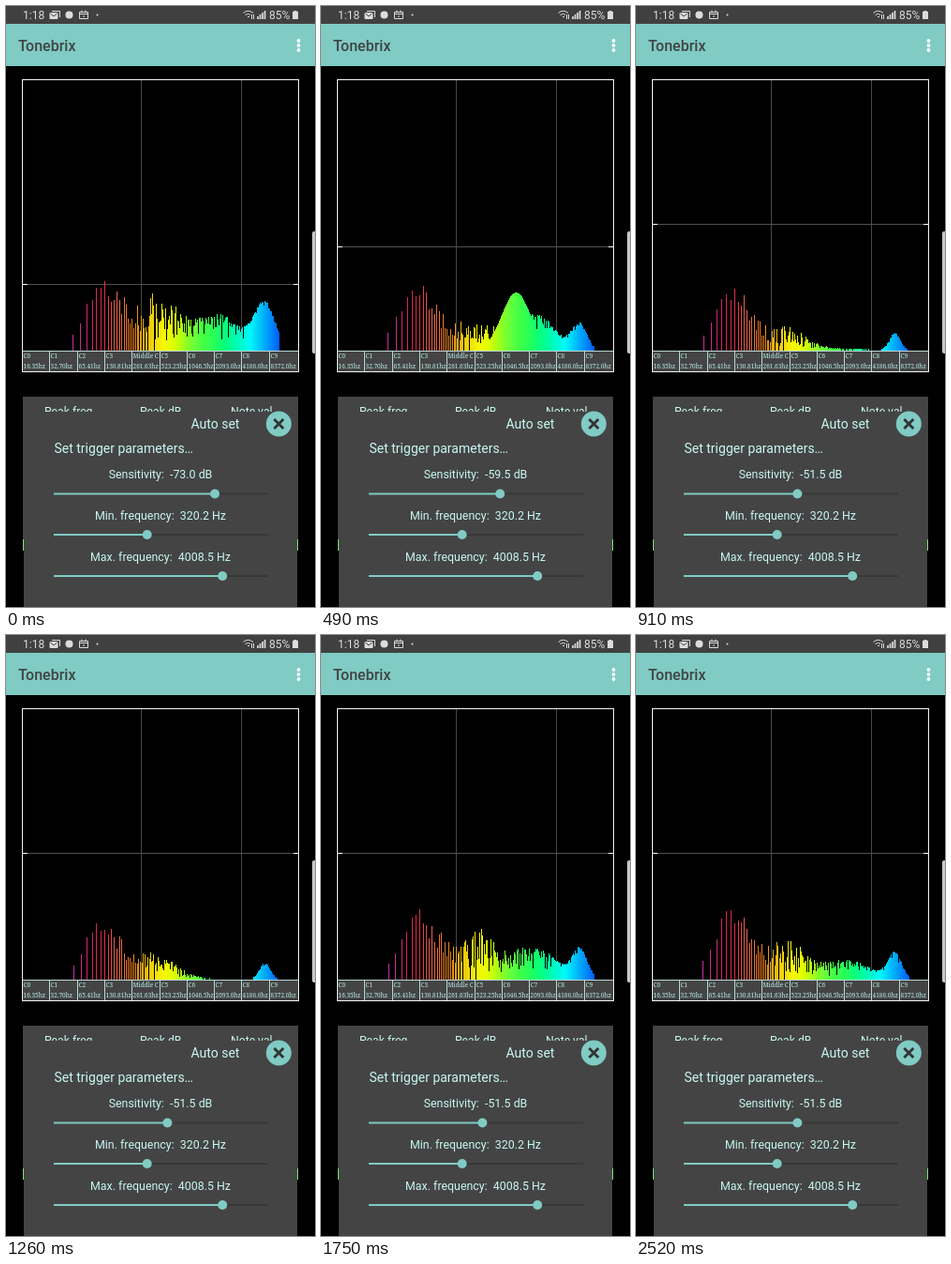
Write an HTML page with a canvas that moves like this. It is 330 by 640 pixels and loops after 2.59 s.

```html
<!DOCTYPE html>
<html lang="en">
<head>
<meta charset="utf-8">
<title>Spectrum trigger</title>
<style>
  html, body { margin: 0; width: 100%; height: 100%; overflow: hidden; background: #000; }
  canvas, svg { position: absolute; left: 0; top: 0; width: 330px; height: 640px; }
  text { font-family: Roboto, sans-serif; white-space: pre; }
  .status { font-size: 12px; fill: #dcdcdc; }
  .title { font-size: 16px; font-weight: 500; fill: #3f4443; }
  .notes text { font: 6.5px "Noto Serif", serif; fill: #b9f0ea; }
  .panel text { fill: #c8f8f2; }
  .small { font-size: 12.2px; }
  .head { font-size: 14px; }
  .value { font-size: 12.4px; text-anchor: middle; }
</style>
</head>
<body>
<canvas id="plot" width="330" height="640"></canvas>
<svg id="ui" viewBox="0 0 330 640">
  <rect width="330" height="19" fill="#404040"/>
  <g class="status">
    <text x="18" y="14">1:18</text>
    <text x="281" y="14">85%</text>
  </g>
  <g fill="none" stroke="#dcdcdc">
    <path d="M49 5.5H57.5V12"/>
    <path d="M47 7.5H55V13.5H47Z" fill="#dcdcdc"/>
    <path d="M47.5 8L51 11L54.5 8" stroke="#404040"/>
    <path d="M78.5 6.5H87.5V13.5H78.5ZM78.5 8.5H87.5M81 4.5V7M85 4.5V7M83 10V12"/>
    <path d="M253.500 7.500Q258.500 3 264 7.500M255.500 9.700Q258.500 7 261 9.500M258 11.500H260M262.500 9V14M264.500 9V14"/>
    <path d="M269 14V11M271.500 14V9M274 14V7M276.500 14V5" stroke-width="1.700"/>
  </g>
  <g fill="#dcdcdc">
    <circle cx="67.500" cy="9.500" r="4"/>
    <circle cx="97.500" cy="9.500" r="1"/>
    <path d="M306 6H307.500V5H310.500V6H312V14H306Z"/>
  </g>

  <rect y="19" width="330" height="45" fill="#80cbc4"/>
  <text class="title" x="13" y="48">Tonebrix</text>
  <path d="M312.500 37h0M312.500 42h0M312.500 47h0" stroke="#fff" stroke-width="3.800" stroke-linecap="round"/>

  <rect x="18" y="367" width="294" height="23" fill="#444"/>
  <rect x="18" y="367" width="294" height="1" fill="#b9d8d5"/>
  <g id="notes" class="notes"></g>
  <rect x="17.500" y="78.500" width="295" height="311" fill="none" stroke="#f4f4f4"/>
  <rect x="327" y="240" width="6" height="130" rx="2" fill="#c8c8c8"/>

  <g class="panel">
    <rect x="18" y="416" width="294" height="152" fill="#444"/>
    <path id="meter" d="M18.500 568V580M311.500 568V580"/>
    <g class="small">
      <text x="41" y="436">Peak freq</text>
      <text x="143" y="436">Peak dB</text>
      <text x="240" y="436">Note val</text>
    </g>
    <rect x="19" y="432" width="292" height="208" fill="#444"/>
    <text class="head" x="197.500" y="450">Auto set</text>
    <circle cx="291.300" cy="445" r="13.500" fill="#80cbc4"/>
    <path d="M286.300 440L296.300 450M296.300 440L286.300 450" stroke="#333" stroke-width="2.800"/>
    <text class="head" x="51.500" y="476">Set trigger parameters…</text>
    <g id="sliders"></g>
  </g>
</svg>
<script>
const LOOP = 2590, STEP = 70, BASE = 367;
const BIN_HZ = 11.65, LOW_C = 16.3516, OCTAVE = 29.3;
// Steps that stay for two ticks
const HELD = [2, 4, 11, 13, 18, 21, 26, 28, 30, 34];
// Loudness of each band of sound over time
const SOUND = [
  { t: 0, voice: 74, mid: 60, air: 38, hiss: 46, whistle: 0 },
  { t: 280, voice: 74, mid: 36, air: 74, hiss: 32, whistle: 124 },
  { t: 700, voice: 66, mid: 22, air: 3, hiss: 18, whistle: 0 },
  { t: 1260, voice: 62, mid: 26, air: 1, hiss: 17, whistle: 0 },
  { t: 1750, voice: 70, mid: 58, air: 34, hiss: 29, whistle: 0 },
  { t: 2100, voice: 75, mid: 26, air: 3, hiss: 13, whistle: 0 },
  { t: 2520, voice: 76, mid: 40, air: 20, hiss: 26, whistle: 0 }
];
const DRAG = [{ t: 0, db: 73 }, { t: 280, db: 67 }, { t: 700, db: 51.5 }];

const $ = id => document.getElementById(id);
const mix = (a, b, k) => a + (b - a) * k;
const clamp = (v, lo, hi) => Math.min(hi, Math.max(lo, v));
const bell = (x, center, width) => Math.exp(-(((x - center) / width) ** 2));
const freqX = hz => 18 + OCTAVE * Math.log2(hz / LOW_C);
const MIN_X = Math.round(freqX(320.2)), MAX_X = Math.round(freqX(4008.5));

function add(parent, tag, attrs, label) {
  const el = document.createElementNS('http://www.w3.org/2000/svg', tag);
  for (const key in attrs) el.setAttribute(key, attrs[key]);
  if (label) el.textContent = label;
  return parent.appendChild(el);
}

function rng(seed) {
  let s = (seed + 11) * 7919;
  return () => {
    s = (s + 0x6D2B79F5) | 0;
    let v = Math.imul(s ^ s >>> 15, 1 | s);
    v ^= v + Math.imul(v ^ v >>> 7, 61 | v);
    return ((v ^ v >>> 14) >>> 0) / 4294967296;
  };
}

// All values of a keyed track at time t
function sample(track, t) {
  const i = track.findLastIndex(key => key.t <= t);
  const a = track[i], b = track[i + 1] || a;
  const k = a === b ? 0 : (t - a.t) / (b.t - a.t);
  return Object.fromEntries(Object.keys(a).map(name => [name, mix(a[name], b[name], k)]));
}

for (let i = 0; i < 10; i++) {
  const x = Math.round(17 + i * OCTAVE);
  if (i) add($('notes'), 'rect', { x, y: 367, width: 1, height: 23, fill: '#b9d8d5' });
  add($('notes'), 'text', { x: x + 1.5, y: 375 }, i === 4 ? 'Middle C' : 'C' + i);
  add($('notes'), 'text', { x: x + 1.5, y: 386 }, (LOW_C * 2 ** i).toFixed(i < 6 ? 2 : 1) + 'hz');
}

function slider(y, label, x) {
  const g = $('sliders');
  const text = add(g, 'text', { class: 'value', x: 165, y: Math.round(y - 16.5) }, label);
  add(g, 'rect', { x: 51, y: y - 1, width: 229, height: 2, fill: '#383838' });
  const fill = add(g, 'rect', { x: 51, y: y - 1, height: 2, fill: '#80cbc4' });
  const thumb = add(g, 'circle', { cy: y, r: 5, fill: '#80cbc4' });
  const move = px => {
    fill.setAttribute('width', px - 51);
    thumb.setAttribute('cx', px);
  };
  move(x);
  return { text, move };
}

const sense = slider(519.5, 'Sensitivity:  -73.0 dB', 223);
slider(563, 'Min. frequency:  320.2 Hz', 150.7);
slider(607, 'Max. frequency:  4008.5 Hz', 231.2);

const ctx = $('plot').getContext('2d');

function rect(color, x, y, w, h) {
  ctx.fillStyle = color;
  ctx.fillRect(x, y, w, h);
}

function barColor(x) {
  const hue = (x - 110) * 1.2 - 14 * bell(x, 180, 18);
  const light = 49 + 14 * bell(x, 208, 20) + 12 * bell(x, 118, 14);
  return `hsl(${hue}, ${Math.min(100, 40 + x / 3)}%, ${light}%)`;
}

// Bar height per pixel column: the loudest frequency bin that falls there
function spectrum(t, step) {
  const s = sample(SOUND, t);
  const rand = rng(step);
  const bars = new Array(330).fill(0);
  const raise = (x, h) => { bars[x] = Math.max(bars[x], Math.round(h)); };

  for (let bin = 5; bin < 900; bin++) {
    const x = freqX((bin + (rand() - .5) * .2) * BIN_HZ);
    const loud = s.voice * bell(x, 103, 28) + s.mid * bell(x, 160, 30)
      + s.air * bell(x, 225, 35) + s.hiss * bell(x, 276, 4 + s.hiss / 4);
    const steady = clamp(1 - bin / 40, .15, .75);
    raise(Math.round(x), loud * 1.06 * mix(steady, 1, rand() ** 1.3));
  }
  for (let x = 165; x < 250; x++) raise(x, s.whistle * bell(x, 208, 22));
  return bars;
}

function draw(step) {
  const t = step * STEP;
  const level = Math.round(sample(DRAG, t).db * 2) / 2;
  const lineY = Math.round(79 + level * 2.97);
  const bars = spectrum(t, step);
  const fired = Math.max(...bars.slice(MIN_X, MAX_X)) > BASE - lineY;

  ctx.clearRect(0, 0, 330, 640);
  rect('#484848', MIN_X, 79, 1, 288);
  rect('#484848', MAX_X, 79, 1, 288);
  rect(fired ? '#f0f0f0' : '#505050', 18, lineY, 294, 1);
  rect('#fff', 18, lineY, 5, 1);
  rect('#fff', 307, lineY, 5, 1);
  bars.forEach((h, x) => {
    if (h > 1) rect(barColor(x), x, BASE - h, 1, h);
  });

  sense.text.textContent = `Sensitivity:  -${level.toFixed(1)} dB`;
  sense.move(51 + level * 2.357);
  $('meter').setAttribute('stroke', fired ? '#3f9a3c' : '#80e878');
}

let shown = -1;
function tick() {
  let step = Math.floor(performance.now() % LOOP / STEP);
  if (HELD.includes(step - 1)) step--;
  if (step !== shown) draw(shown = step);
  requestAnimationFrame(tick);
}
tick();
</script>
</body>
</html>
```
